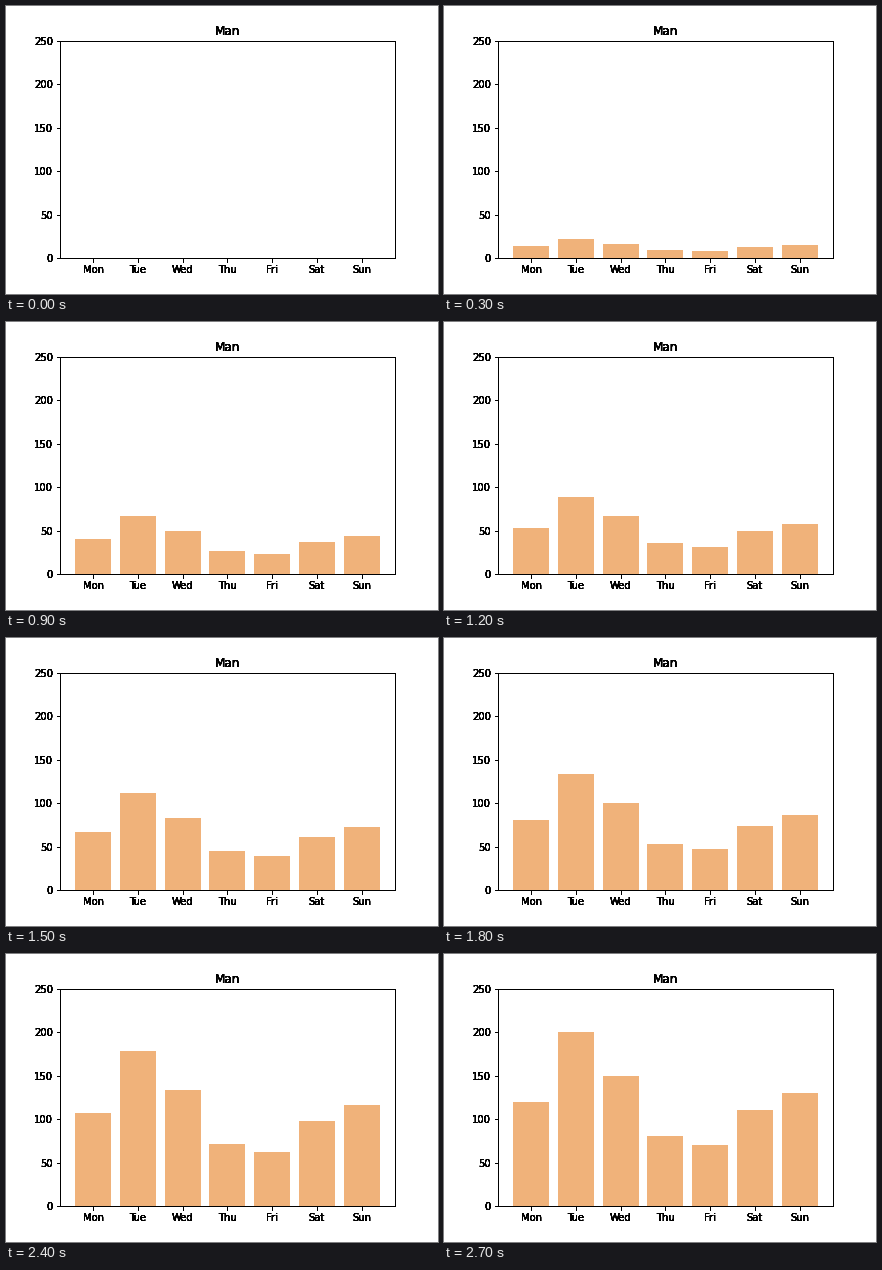
Recreate the animation shown at these times as a matplotlib script. Size 432x288 px, loop 3000 ms.

```python
import matplotlib.pyplot as plt
from matplotlib.animation import FuncAnimation

DAYS = ["Mon", "Tue", "Wed", "Thu", "Fri", "Sat", "Sun"]
TOTALS = [120, 200, 150, 80, 70, 110, 130]
STEPS = 10
LAYERS = 8  # stacked frames turn soft text edges solid black

plt.rcParams.update({"font.family": "DejaVu Sans", "font.size": 10})
fig = plt.figure(figsize=(6, 4), dpi=72, facecolor="white")


def add_layer():
    ax = fig.add_axes([0.125, 0.125, 0.775, 0.755])
    ax.patch.set_visible(False)
    ax.set_xlim(-0.74, 6.74)
    ax.set_ylim(0, 250)
    ax.set_xticks(range(len(DAYS)), DAYS)
    ax.set_title("Man")
    return ax


layers = [add_layer() for _ in range(LAYERS)]
bars = layers[0].bar(range(len(DAYS)), [0] * len(DAYS), color="#f0b27a")


def update(step):
    for bar, total in zip(bars, TOTALS):
        bar.set_height(total * step / (STEPS - 1))
    return list(bars)


anim = FuncAnimation(fig, update, frames=STEPS, interval=300,
                     init_func=lambda: update(0), repeat=True, repeat_delay=0)
plt.show()
```
